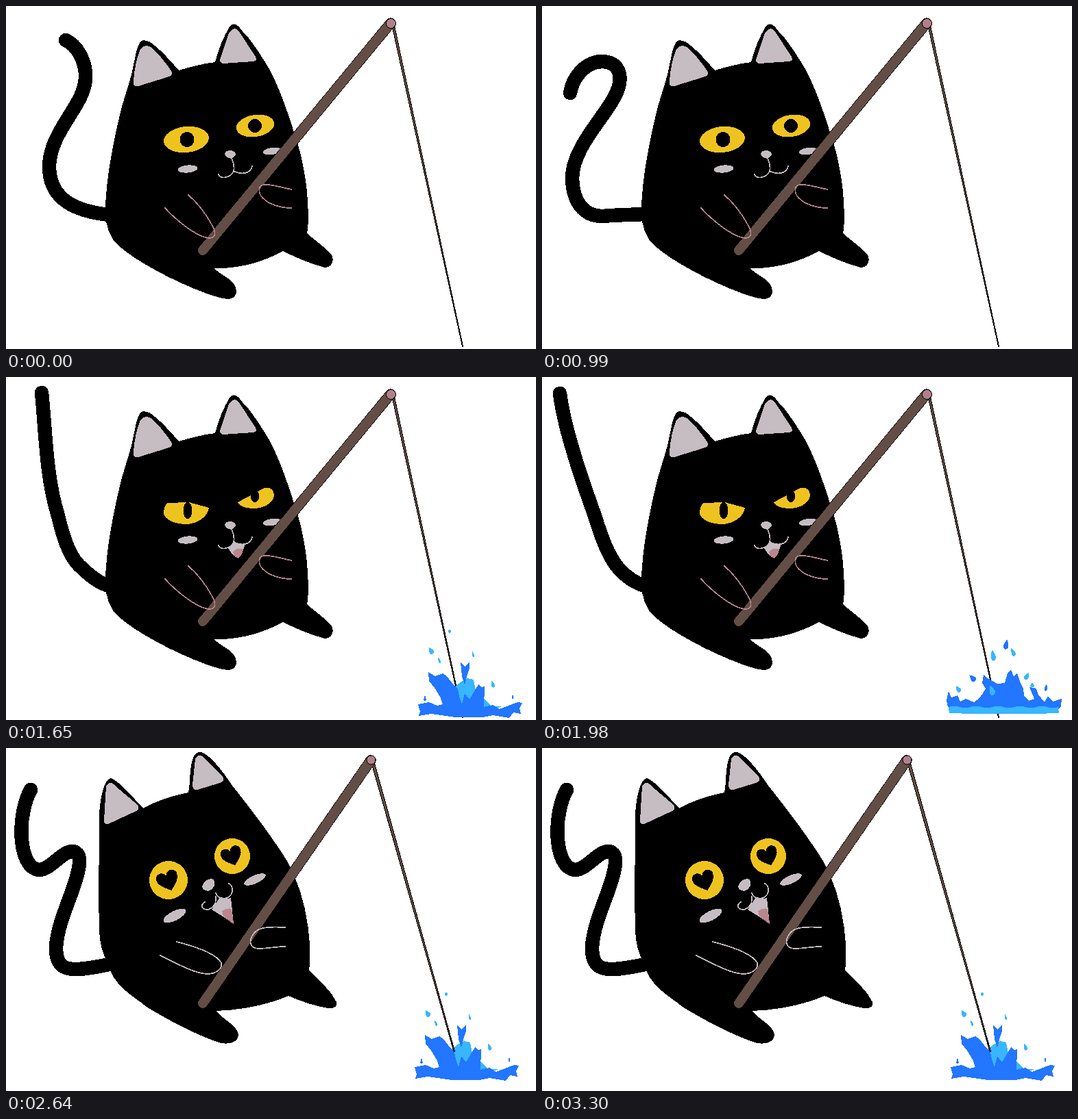
These frames come from a looping animation (773x501 px, 3.63 s). An HTML page:

```html
<!DOCTYPE html>
<html lang="en">
<head>
<meta charset="utf-8">
<title>Fishing cat</title>
<style>
  html, body { margin: 0; width: 100%; height: 100%; overflow: hidden; background: #fff; }
  svg { display: block; width: 100vw; height: 100vh; shape-rendering: crispEdges; }

  .sit, .calm, .alert, .happy, .even, .odd { animation: 3630ms step-end infinite; }
  .sit { animation-name: sit; }
  .calm { animation-name: calm; }
  .alert { animation-name: alert; }
  .happy { animation-name: happy; }
  .even { animation-name: even; }
  .odd { animation-name: odd; }

  /* Eleven poses of 330 ms each */
  @keyframes sit { 0% { opacity: 1 } 72.72%, 100% { opacity: 0 } }
  @keyframes calm { 0% { opacity: 1 } 36.36%, 100% { opacity: 0 } }
  @keyframes alert { 0%, 72.72%, 100% { opacity: 0 } 36.36% { opacity: 1 } }
  @keyframes happy { 0% { opacity: 0 } 72.72%, 100% { opacity: 1 } }
  @keyframes even {
    0%, 18.18%, 36.36%, 54.54%, 72.72%, 90.9%, 100% { opacity: 1 }
    9.09%, 27.27%, 45.45%, 63.63%, 81.81% { opacity: 0 }
  }
  @keyframes odd {
    0%, 18.18%, 36.36%, 54.54%, 72.72%, 90.9%, 100% { opacity: 0 }
    9.09%, 27.27%, 45.45%, 63.63%, 81.81% { opacity: 1 }
  }

  .tail { fill: none; stroke: #000; stroke-width: 20.5; stroke-linecap: round; }
  .pale { fill: #c6bdc2; }
  .gold { fill: #efc31f; }
  .pink { fill: #bb858f; }
  .dark { fill: #2276ff; }
  .light { fill: #38b6ff; }
  .line { fill: none; stroke: #c6bdc2; stroke-width: 1.7; stroke-linecap: round; }
  .rosy { stroke: #bb858f; }
  .edge { fill: none; stroke: #000; stroke-width: 15.4; stroke-linecap: round; }
  .wood { fill: none; stroke: #634e46; stroke-width: 14; stroke-linecap: round; }
  .cord { fill: #634e46; stroke: #000; stroke-width: 1; }
  .tip { fill: #b0808a; stroke: #000; }
</style>
</head>
<body>
<svg viewBox="0 0 773 501" preserveAspectRatio="none">
  <defs>
    <path id="heart" d="M0,16 C-8,9 -17,3 -16,-6 C-14,-15 -3,-15 0,-7 C3,-15 14,-15 16,-6 C17,3 8,9 0,16Z"/>
    <path id="drop" d="M0,-8 C3,-3 5,1 4,4 C2,8 -3,8 -4,4 C-5,1 -2,-4 0,-8Z"/>

    <g id="crown">
      <path class="dark" d="M592,482 L590,472 L593,459 L597,468 L606,465 L610,474 L618,470 L630,475 L637,470 L643,462 L647,455 L642,447 L644,435 L650,440 L657,444 L664,448 L675,447 L679,432 L684,428 L688,437 L693,433 L698,447 L702,455 L703,465 L710,473 L718,470 L711,453 L721,455 L724,464 L733,475 L738,466 L745,474 L758,470 L757,481 L752,486 H596Z"/>
      <path class="light" d="M593,482 q8,-3 16,0 t16,0 t16,0 t16,0 t16,0 t16,0 t16,0 t16,0 t16,0 t16,0 L754,491 Q675,494 594,491Z"/>
      <g class="light">
        <use href="#drop" transform="translate(656 458) rotate(-20)"/>
        <use href="#drop" transform="translate(658 407) rotate(-12) scale(.9 1.1)"/>
        <use href="#drop" transform="translate(687 402) rotate(-25) scale(.7 .9)"/>
        <use href="#drop" transform="translate(707 437) rotate(30) scale(.8)"/>
        <use href="#drop" transform="translate(607 456) rotate(-35) scale(.8 .7)"/>
        <use href="#drop" transform="translate(715 450) scale(.7 .5)"/>
      </g>
      <g class="dark">
        <use href="#drop" transform="translate(677 391) rotate(8) scale(.9 1)"/>
        <use href="#drop" transform="translate(628 440) rotate(-45) scale(.9 .8)"/>
        <use href="#drop" transform="translate(735 454) rotate(10) scale(.5 .7)"/>
      </g>
    </g>

    <g id="burst">
      <path class="light" d="M638,430 L650,440 L659,433 L668,428 L677,430 L680,445 L693,443 L690,456 L703,468 L722,470 L650,475Z"/>
      <path class="dark" d="M597,483 L599,477 L596,466 L612,463 L624,468 L632,466 L628,455 L620,442 L612,432 L611,419 L621,425 L632,421 L638,425 L645,434 L654,444 L656,455 L660,466 L664,450 L671,459 L684,437 L689,441 L693,440 L692,470 L705,467 L715,473 L728,468 L741,463 L748,464 L744,472 L746,480 L735,478 L729,486 L705,482 L690,485 L650,485 L615,480Z"/>
      <path class="dark" d="M658,405 L664,411 L671,404 L671,414 L667,426 L664,438 L660,425Z"/>
      <g class="light">
        <use href="#drop" transform="translate(615 388) rotate(-30) scale(.8 .7)"/>
        <use href="#drop" transform="translate(642 359) scale(.5 .4)"/>
        <use href="#drop" transform="translate(676 393) rotate(-15) scale(.4 .6)"/>
        <use href="#drop" transform="translate(705 437) rotate(-20) scale(.6 .7)"/>
        <use href="#drop" transform="translate(627 402) rotate(-25) scale(.4 .6)"/>
      </g>
      <g class="dark">
        <use href="#drop" transform="translate(606 457) scale(.4 .6)"/>
        <use href="#drop" transform="translate(734 455) scale(.3 .5)"/>
      </g>
    </g>
  </defs>

  <g class="sit">
    <path class="cord" d="M563.5,31 L567,31 L666.5,497 L665.5,497Z"/>

    <g class="calm">
      <path class="tail even" d="M87,50 C103,57 117,80 116,105 C115,145 66,180 63,232 C62,285 105,300 150,305"/>
      <path class="tail odd" d="M41,127 C46,100 66,81 88,81 C108,82 116,95 113,113 C107,150 44,200 44,252 C45,285 60,307 88,307 C110,305 130,305 150,304"/>
    </g>
    <g class="alert">
      <g class="even">
        <path class="tail" d="M26,24 C31,62 42,97 52,130 C61,158 69,180 77,203 C88,238 97,262 112,280 C124,293 136,301 150,305"/>
        <use href="#crown"/>
      </g>
      <g class="odd">
        <path class="tail" d="M52,23 C58,80 58,145 76,203 C86,245 96,268 112,280 C125,293 136,301 150,305"/>
        <use href="#burst" x="5" y="12"/>
      </g>
    </g>

    <path d="M201,50 C192,50 189,72 186,86 C183,104 175,126 169,147 C157,195 145,255 145,300 C145,322 152,340 164,350 C190,373 244,402 290,419 C304,424 316,428 325,428 C338,427 339,413 331,404 C323,396 312,391 303,383 C345,384 378,372 404,358 C422,367 445,377 465,382 C476,382 480,370 474,362 C465,352 450,342 439,332 C442,318 441,290 438,262 C434,232 428,205 418,178 C409,150 399,120 384,92 C372,72 355,46 345,37 C337,26 331,22 325,32 C318,44 310,62 305,82 C287,84 269,89 252,94 C240,80 222,60 209,52Z"/>
    <g class="pale">
      <path d="M196,63 Q204,54 214,62 Q230,78 241,95 Q245,100 238,103 L193,117 Q185,119 186,109 Q188,82 196,63Z"/>
      <path d="M325,40 Q333,27 341,39 L364,74 Q367,80 360,81 L317,84 Q310,83 313,75Z"/>
      <ellipse rx="14.5" ry="5.5" transform="translate(265 238) rotate(-5)"/>
      <ellipse rx="13" ry="5" transform="translate(388 212) rotate(-8)"/>
      <path d="M319,216 Q320,211 328,211 Q335,212 335,217 Q332,222 328,223 Q320,221 319,216Z"/>
    </g>

    <g class="calm">
      <ellipse class="gold" rx="33" ry="19" transform="translate(263 195) rotate(-6)"/>
      <ellipse cx="264" cy="195" rx="10.5" ry="11"/>
      <ellipse class="gold" rx="28" ry="16" transform="translate(363.5 175) rotate(-9)"/>
      <circle cx="363" cy="175" r="10"/>
    </g>
    <g class="alert">
      <path class="gold" d="M235,184 L267,183 L296,191 C294,204 280,215 261,215 C240,214 229,205 230,197 Q231,188 235,184Z"/>
      <ellipse cx="265" cy="195" rx="6.5" ry="12"/>
      <path class="gold" d="M338,183 L377,162 C386,160 391,166 391,173 C390,184 376,192 361,192 C348,192 340,188 338,183Z"/>
      <ellipse cx="363" cy="174" rx="6" ry="9"/>
      <path class="pale" d="M324,250 Q330,247 333,240 Q340,245 349,243 Q346,256 340,264 Q332,264 324,250Z"/>
      <path class="pink" d="M331,256 Q335,249 346,251 Q345,260 339,265 Q333,264 331,256Z"/>
    </g>
    <path class="line" d="M329,222 Q334,234 332,242 M310,246 C313,253 327,252 332,241 C343,247 357,245 359,234"/>

    <path class="edge" d="M287,357 L561,25"/>
    <path class="wood" d="M287,357 L561,25"/>
    <circle class="tip" cx="561.5" cy="25.5" r="7"/>
    <path class="line rosy" d="M232,295 C250,315 280,338 297,339 C307,338 306,330 301,321 C294,308 282,290 266,276 M416,268 C400,264 385,260 376,261 C368,262 367,272 374,280 C385,291 402,295 416,295"/>
  </g>

  <g class="happy">
    <g class="even">
      <path class="tail" d="M36,61 C28,75 20,105 23,135 C26,165 37,178 50,178 C68,175 82,150 98,151 C112,154 107,175 102,192 C94,220 74,260 73,292 C73,318 85,324 105,323 C125,322 140,318 155,315"/>
      <use href="#burst"/>
    </g>
    <g class="odd">
      <path class="tail" d="M62,66 C76,85 78,112 70,135 C60,160 36,165 34,185 C34,210 72,215 76,245 C80,275 66,300 84,315 C100,325 130,320 155,315"/>
      <use href="#crown" x="-10" y="-5"/>
    </g>
    <path class="cord" d="M533.5,24 L538,24 L654.5,443 L653,443Z"/>

    <path d="M153,44 C143,46 138,70 136,95 C136,150 134,250 137,280 C140,300 147,310 152,325 C162,350 185,362 205,378 C240,400 285,422 310,430 C328,435 340,428 339,418 C337,406 318,397 306,384 C345,383 385,374 412,362 C430,370 450,377 470,380 C480,381 484,376 482,371 C475,355 457,340 442,325 C444,310 444,290 441,265 C436,225 425,192 410,165 C385,125 350,80 330,55 C315,32 297,10 285,6 C274,4 271,18 269,32 C268,45 268,55 266,65 C240,70 218,78 200,88 C188,76 168,50 153,44Z"/>
    <g class="pale">
      <path d="M146,56 Q152,46 160,56 L192,83 Q196,89 190,92 L149,111 Q143,113 143,105Z"/>
      <path d="M276,16 Q281,7 289,14 Q302,28 317,43 Q319,49 312,51 L279,61 Q272,62 272,54Z"/>
      <ellipse rx="18" ry="7" transform="translate(246 245) rotate(-27)"/>
      <ellipse rx="17" ry="6" transform="translate(363 192) rotate(-24)"/>
      <path d="M286,202 Q290,191 300,191 Q306,193 304,201 Q300,208 294,209 Q286,207 286,202Z"/>
      <path d="M300,236 Q308,224 312,218 Q320,222 328,219 L332,257 Q315,245 300,236Z"/>
    </g>
    <path class="pink" d="M317,246 L315,238 Q322,233 329,235 L332,257Z"/>
    <path class="line" d="M290,225 C283,230 285,236 295,236 C304,233 307,225 306,217 M306,212 C308,221 326,224 330,210 C331,204 328,199 325,198"/>

    <circle class="gold" cx="237" cy="193" r="28"/>
    <use href="#heart" transform="translate(236 193) rotate(-20)"/>
    <circle class="gold" cx="330" cy="158" r="26"/>
    <use href="#heart" transform="translate(329 157) rotate(-20) scale(.96)"/>

    <path class="edge" d="M287,373 L532,18"/>
    <path class="wood" d="M287,373 L532,18"/>
    <circle class="tip" cx="532.5" cy="17.5" r="6.5"/>
    <path class="line" d="M225,303 C245,312 270,328 292,330 C308,330 316,322 314,314 C308,302 280,291 249,283 M407,262 C385,261 370,261 362,270 C354,280 354,292 368,293 C380,293 395,290 407,290"/>
  </g>
</svg>
</body>
</html>
```
